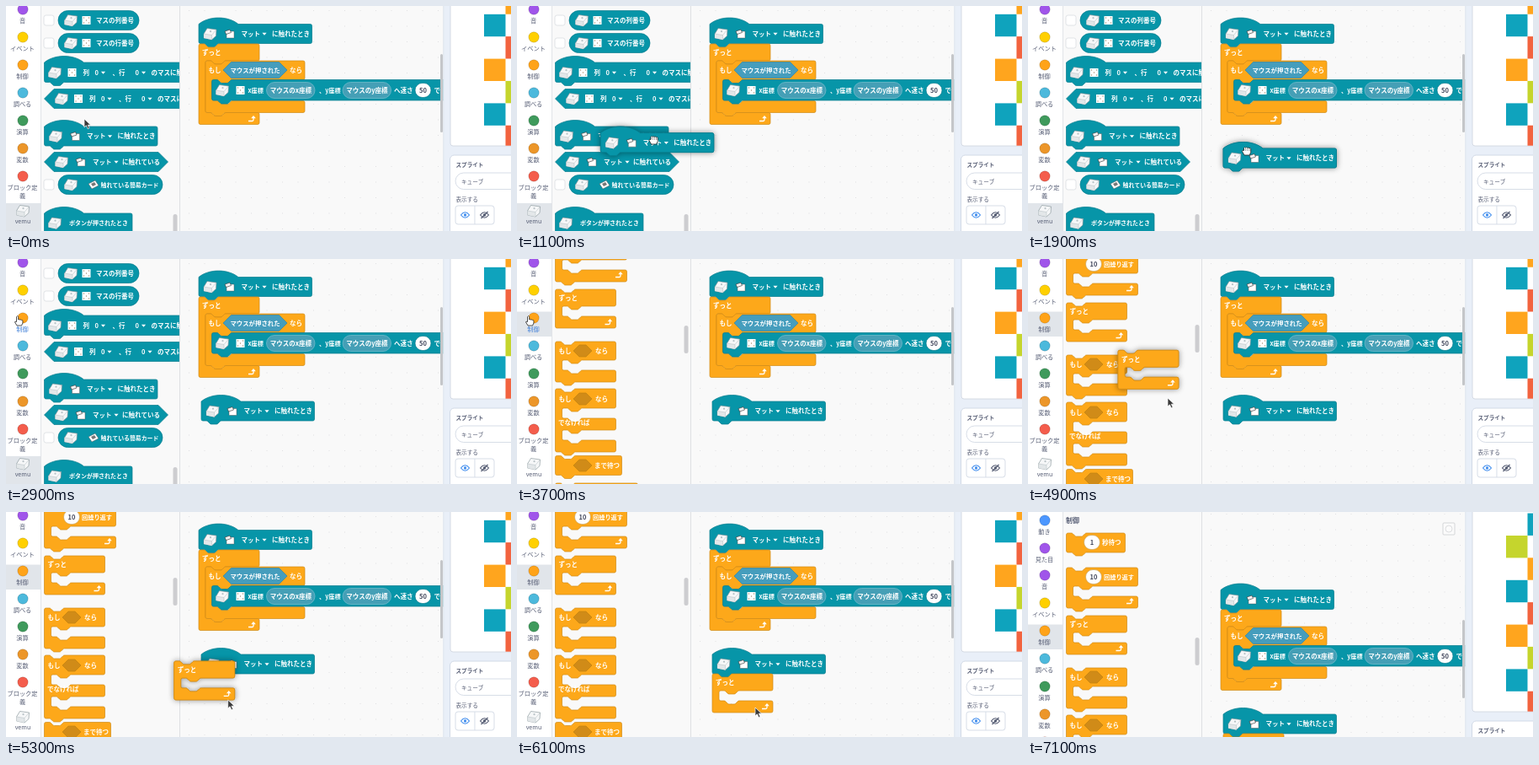
Write an HTML page with a canvas that moves like this. It is 600 px wide and 267 px high and loops after 8 s.

```html
<!DOCTYPE html>
<html lang="ja">
<head>
<meta charset="utf-8">
<title>Block editor</title>
<style>
html, body { margin: 0; width: 100%; height: 100%; overflow: hidden; background: #f9f9f9; }
canvas { display: block; width: 600px; height: 267px; }
</style>
</head>
<body>
<canvas id="stage"></canvas>
<script>
const canvas = document.getElementById('stage');
const ctx = canvas.getContext('2d');
const ratio = window.devicePixelRatio || 1;
canvas.width = 600 * ratio;
canvas.height = 267 * ratio;

const LOOP = 8000, STEP = 100;
const FAMILY = '"Noto Sans CJK JP", "Noto Sans CJK", "Noto Sans", sans-serif';
const TEAL = ['#0795a8', '#067c8d'];
const ORANGE = ['#fda81a', '#d08b18'];
const BLUE = ['#459dbd', '#2f86a8'];
const GREEN = ['#59c059', '#389438'];
const INK = '#575e75';

// Cursor path: time, x, y of the tip
const PATH = [
  [0, 93, 134], [400, 93, 134], [600, 73, 147], [800, 73, 147], [1000, 110, 152],
  [1200, 215, 168], [1400, 260, 173], [2500, 260, 173], [2700, 140, 125], [2900, 15, 73],
  [4200, 15, 73], [4500, 88, 90], [4600, 96, 92], [4700, 118, 108], [4800, 154, 140],
  [4900, 166, 165], [5100, 225, 205], [5400, 283, 232], [LOOP, 283, 232]
];

function cursorAt(t) {
  const i = Math.max(1, PATH.findIndex(p => p[0] >= t));
  const [t0, x0, y0] = PATH[i - 1], [t1, x1, y1] = PATH[i];
  const k = (t - t0) / (t1 - t0);
  return [x0 + (x1 - x0) * k, y0 + (y1 - y0) * k];
}

// ---- primitives ----
function rect(x, y, w, h, fill) {
  ctx.fillStyle = fill;
  ctx.fillRect(x, y, w, h);
}

function paint(path, fill, stroke, width = 0.7) {
  if (fill) { ctx.fillStyle = fill; ctx.fill(path); }
  if (stroke) { ctx.strokeStyle = stroke; ctx.lineWidth = width; ctx.stroke(path); }
}

function round(x, y, w, h, r, fill, stroke, width) {
  const p = new Path2D();
  p.roundRect(x, y, w, h, r);
  paint(p, fill, stroke, width);
}

function dot(x, y, r, fill, stroke, width) {
  const p = new Path2D();
  p.arc(x, y, r, 0, 7);
  paint(p, fill, stroke, width);
}

function label(text, x, y, { color = '#fff', size = 7.5, weight = 700, align = 'left' } = {}) {
  ctx.font = `${weight} ${size}px ${FAMILY}`;
  ctx.textAlign = align;
  ctx.textBaseline = 'middle';
  ctx.fillStyle = color;
  ctx.fillText(text, x, y);
}

function clipped(x, w, body) {
  ctx.save();
  ctx.beginPath();
  ctx.rect(x, -80, w, 360);
  ctx.clip();
  body();
  ctx.restore();
}

// ---- block shapes ----
const NOTCH = 'c1,0 1.5,.5 2,1l2,2c.5,.5 1,1 2,1h6c1,0 1.5,-.5 2,-1l2,-2c.5,-.5 1,-1 2,-1';
const NOTCH_BACK = 'c-1,0 -1.5,.5 -2,1l-2,2c-.5,.5 -1,1 -2,1h-6c-1,0 -1.5,-.5 -2,-1l-2,-2c-.5,-.5 -1,-1 -2,-1';

// rows alternate between solid bars and open mouths
function block(x, y, w, rows, [fill, edge], { hat = false, cap = false } = {}) {
  const right = x + w - 2;
  let d = hat ? `M${x},${y}c12,-10 35,-10 47,0` : `M${x},${y + 2}q0,-2 2,-2h4${NOTCH}`;
  d += `H${right}q2,0 2,2`;
  rows.forEach((h, i) => {
    y += h;
    if (i % 2) d += `V${y - 2}q0,2 2,2h4${NOTCH}H${right}q2,0 2,2`;
    else {
      d += `V${y - 2}q0,2 -2,2`;
      if (i < rows.length - 1) d += `H${x + 32}${NOTCH_BACK}h-4q-2,0 -2,2`;
    }
  });
  if (!cap) d += `H${x + 24}${NOTCH_BACK}`;
  d += `H${x + 2}q-2,0 -2,-2z`;
  paint(new Path2D(d), fill, edge);
}

function hex(x, y, w, h, [fill, edge]) {
  const r = h / 2;
  paint(new Path2D(`M${x},${y}l${r},${-r}h${w - h}l${r},${r}l${-r},${r}h${h - w}z`), fill, edge);
}

function pill(x, y, w, h, [fill, edge]) {
  round(x, y - h / 2, w, h, h / 2, fill, edge);
}

function number(text, x, y, edge = '#c9a35a') {
  pill(x - 9.5, y, 19, 17, ['#fff', edge]);
  label(text, x, y + 0.5, { color: '#3f455a', align: 'center' });
}

function arrowDown(x, y) {
  paint(new Path2D(`M${x - 2.6},${y - 1.2}h5.2l-2.6,3z`), '#fff');
}

function loopArrow(x, y) {
  paint(new Path2D(`M${x - 4},${y + 2.5}h4.5q1.5,0 1.5,-1.5v-2`), null, '#fff', 1.3);
  paint(new Path2D(`M${x - 0.8},${y - 0.8}h5.6l-2.8,-3.2z`), '#fff');
}

// ---- block icons ----
function cube(x, y) {
  paint(new Path2D(`M${x - 7.5},${y}l4,-6.5l11,1.5l-.5,7.5l-5,4.5l-9.5,-2z`), '#f6f7f8', '#7d8b90', 0.6);
  paint(new Path2D(`M${x - 7.5},${y}l9.5,1.5v5.5l-9.5,-2z`), '#e3e7e9');
  paint(new Path2D(`M${x - 7.5},${y}l9.5,1.5l5.5,-6.5M${x + 2},${y + 1.5}v5.5`), null, '#b3bcc0', 0.5);
  dot(x + 0.5, y - 2.8, 1.1, '#b8c2c6');
}

function tile(x, y) {
  rect(x - 5, y - 5, 10, 10, '#fff');
  for (const [dx, dy] of [[-3, -3], [3, -3], [0, 0], [-3, 3], [3, 3]]) dot(x + dx, y + dy, 0.7, '#a58f72');
}

function mat(x, y) {
  round(x - 4, y - 3, 9, 8, 0.5, '#fff', '#555', 0.5);
  paint(new Path2D(`M${x - 6},${y - 3}l6,-2l1.5,3.5l-6,2z`), '#f2f2f2', '#333', 0.6);
}

function card(x, y) {
  paint(new Path2D(`M${x - 6},${y - 1}l8,-4l4,6l-8,4z`), '#fff', '#555', 0.5);
  paint(new Path2D(`M${x - 3},${y - 1}l4,-2l2,3l-4,2z`), '#777');
}

// ---- composite blocks ----
function matHat(x, y) {
  block(x, y, 134.5, [23], TEAL, { hat: true });
  const m = y + 11.5;
  cube(x + 13.5, m);
  mat(x + 37, m);
  label('マット', x + 50.5, m);
  arrowDown(x + 78, m);
  label('に触れたとき', x + 87, m);
}

function forever(x, y) {
  block(x, y, 72, [20, 12, 14], ORANGE, { cap: true });
  label('ずっと', x + 4, y + 10.5);
  loopArrow(x + 63, y + 39);
}

function operand(text, x) {
  pill(x, 100, 57.5, 19, ['#459fb6', '#78bfce']);
  label(text, x + 28.8, 100, { align: 'center' });
}

function mainStack() {
  matHat(229, 21.5);
  block(229, 45, 72, [20, 61.5, 14], ORANGE, { cap: true });
  label('ずっと', 233, 55);
  loopArrow(292, 134);
  block(237, 65, 118, [22.5, 25, 14], ORANGE);
  label('もし', 240.5, 76);
  hex(258, 76, 76, 19, BLUE);
  label('マウスが押された', 296, 76, { align: 'center', size: 7.4 });
  label('なら', 337, 76);
  block(244.5, 87.5, 300, [24.5], TEAL);
  cube(257, 100);
  tile(278.5, 100);
  label('x座標', 287.5, 100, { size: 7.2 });
  operand('マウスのx座標', 309.5);
  label('、y座標', 372, 100, { size: 7.2 });
  operand('マウスのy座標', 400);
  label('へ速さ', 461, 100);
  number('50', 495.5, 100, TEAL[1]);
  label('で', 508.5, 100);
}

// ---- palettes ----
function reporter(text, y, w, icon, iconX, textX, size) {
  round(45, y - 6, 12, 12, 2.5, '#fff', '#d4d8dd');
  pill(62, y, w, 23, TEAL);
  cube(77, y);
  icon(iconX, y);
  label(text, textX, y, { size });
}

function cellLabels(x, y) {
  tile(x, y);
  label('列', x + 13, y);
  label('0', x + 27, y);
  arrowDown(x + 37, y);
  label('、行', x + 48, y);
  label('0', x + 75, y);
  arrowDown(x + 85, y);
  label('のマスに触れた', x + 94, y);
}

function cubePalette() {
  reporter('マスの列番号', 17, 96, tile, 95.5, 107);
  reporter('マスの行番号', 44, 96, tile, 95.5, 107);
  block(45.5, 67, 200, [23.5], TEAL, { hat: true });
  cube(58, 79);
  cellLabels(78.5, 79);
  hex(45.5, 110, 220, 23, TEAL);
  cube(66, 110);
  cellLabels(86, 110);
  matHat(45.5, 143);
  hex(45.5, 185, 147, 23, TEAL);
  cube(66, 185);
  mat(89, 185);
  label('マット', 103, 185);
  arrowDown(131, 185);
  label('に触れている', 138, 185);
  reporter('触れている簡易カード', 212, 124, card, 104, 112.5, 6.9);
  block(45.5, 246, 104.5, [23], TEAL, { hat: true });
  cube(58, 257.5);
  label('ボタンが押されたとき', 75, 257.5, { size: 7 });
}

function ifHead(y) {
  label('もし', 49.5, y);
  hex(67, y, 22, 14, [ORANGE[1], '#c0810f']);
  label('なら', 93, y);
}

function controlPalette() {
  label('制御', 45, -61, { color: INK, size: 8 });
  block(45.5, -46, 70, [23], ORANGE);
  number('1', 76, -35);
  label('秒待つ', 88, -35);
  block(45.5, -5, 85, [22, 12, 14], ORANGE);
  number('10', 78, 6);
  label('回繰り返す', 90, 6, { size: 7.2 });
  loopArrow(121, 35);
  forever(45.5, 52);
  block(45.5, 114, 72, [22, 12, 14], ORANGE);
  ifHead(125);
  block(45.5, 170, 72, [23, 12, 14, 12, 14], ORANGE);
  ifHead(182);
  label('でなければ', 49, 210);
  block(45.5, 249.5, 79, [23], ORANGE);
  hex(67, 261, 22, 14, [ORANGE[1], '#c0810f']);
  label('まで待つ', 92, 261);
  block(45.5, 282, 98, [22, 12, 14], ORANGE);
  hex(67, 293, 22, 14, [ORANGE[1], '#c0810f']);
  label('まで繰り返す', 92, 293);
  loopArrow(134, 322);
  block(45.5, 347, 76, [23], ORANGE, { cap: true });
  label('すべて', 50, 358);
  arrowDown(78, 358);
  label('を止める', 85, 358);
  block(45.5, 393, 92, [23], ORANGE, { hat: true });
  label('クローンされたとき', 50, 404);
}

function operatorPalette() {
  for (let i = 0; i < 18; i++) {
    const y = 1050 + i * 33;
    pill(45, y, 66, 21, GREEN);
    pill(50, y, 19, 15, ['#fff', GREEN[1]]);
    label('+-×÷'[i % 4], 78, y, { align: 'center' });
    pill(87, y, 19, 15, ['#fff', GREEN[1]]);
  }
}

// ---- regions ----
const CATEGORIES = [
  ['動き', -61, '#4c97ff'], ['見た目', -28, '#a055ea'], ['音', 4, '#a055ea'],
  ['イベント', 37, '#ffd000'], ['制御', 70, '#ffa319'], ['調べる', 103, '#4cb9dc'],
  ['演算', 136, '#3f9a5c'], ['変数', 169, '#ec9629'], ['ブロック定', 202, '#f45d4c']
];

function categories(selected, hovered) {
  rect(0, -80, 41, 360, '#fff');
  const plain = { color: INK, size: 7.2, weight: 500, align: 'center' };
  for (const [name, y, color] of CATEGORIES) {
    if (name === selected) rect(0, y - 7.5, 41, 29.5, '#e1e5ea');
    dot(20, y, 6.2, color, 'rgba(0,0,0,.18)', 0.8);
    label(name, 19.5, y + 13.5, { ...plain, color: name === hovered ? '#3f7fd8' : INK });
  }
  label('義', 19.5, 225, plain);
  if (selected === 'vemu') rect(0, 234, 41, 50, '#e1e5ea');
  cube(20, 243);
  label('vemu', 20, 255, plain);
  rect(41, -80, 0.8, 360, '#dcdfe4');
}

function palette(scroll) {
  rect(41, -80, 165, 360, '#f9f9f9');
  clipped(41, 165, () => {
    if (scroll === null) return cubePalette();
    ctx.translate(0, -scroll);
    controlPalette();
    operatorPalette();
  });
  rect(206, -80, 0.8, 360, '#d8dade');
  const thumb = scroll === null ? 247 : 78 + scroll * 0.07;
  round(198.5, thumb, 5, 33, 2.5, '#cdcdd0');
}

function workspace(t) {
  rect(206, -80, 313.5, 360, '#f9f9f9');
  clipped(206, 313.5, () => {
    for (let x = 217; x < 519; x += 18.5)
      for (let y = -69; y < 270; y += 18.5) rect(x, y, 1, 1, '#e0e0e2');
    round(493, -58, 14, 14, 1, '#fbfbfb', '#c5c7ca');
    dot(500, -51, 4, null, '#d5d6d9', 0.8);
    mainStack();
    if (t >= 2000) matHat(232, 169);
    if (t >= 5600) forever(232, 192);
    round(516, 57, 3, 93, 1.5, '#c4c6c9');
  });
}

function eye(x, y, color, off) {
  paint(new Path2D(`M${x - 5},${y}q5,-6.5 10,0q-5,6.5 -10,0z`), null, color, 1.2);
  dot(x, y, 1.7, color);
  if (off) paint(new Path2D(`M${x - 4},${y + 4}l8,-8`), null, color, 1.2);
}

function sidePanel() {
  rect(519.5, -80, 81, 360, '#e9eff8');
  rect(519.5, -80, 0.8, 360, '#dde3ec');
  round(528, -90, 90, 256, 3, '#fff', '#cdd4de', 0.8);
  const lime = '#c5d52d', teal = '#0fa3bd', orange = '#ffa51e', red = '#f2633f';
  const cell = 26.4;
  [lime, teal, orange, teal].forEach((c, i) => rect(568, -43 + i * 2 * cell, 25.5, cell, c));
  [teal, orange, red, lime, red].forEach((c, i) => rect(593.5, -69.5 + i * 2 * cell, 7, i < 4 ? cell : 24, c));
  round(527.5, 177, 90, 110, 5, '#fff', '#cdd6e4', 0.9);
  const small = { color: INK, size: 6.6, weight: 500 };
  label('スプライト', 534.5, 188.5, { ...small, weight: 700 });
  round(534, 198, 90, 19.5, 9.75, '#fff', '#d3dae5', 0.9);
  label('キューブ', 541, 208, small);
  label('表示する', 534.5, 229.5, small);
  round(534, 237, 46, 22, 3, '#fff', '#d3dae5', 0.9);
  rect(556.5, 237, 0.9, 22, '#d3dae5');
  eye(545.5, 248, '#4590ee');
  eye(568.5, 248, INK, true);
}

// ---- cursors ----
function arrowCursor(x, y) {
  paint(new Path2D(`M${x},${y}v10l2.4,-2.2l1.8,4l1.8,-.9l-1.7,-3.7h3.3z`), '#3a3a3a', '#fff', 0.7);
}

function grabCursor(x, y) {
  paint(new Path2D(`M${x - 3},${y + 4}l-2.5,-4.5q0,-2 2,-1v-3q1,-2 2,0q1,-2 2.2,0q1.2,-1.3 2.2,.3q1.5,-.8 1.8,.8v4l-1.5,3.4z`), '#fff', '#222', 0.8);
  paint(new Path2D(`M${x - 1.4},${y - 4}v3M${x + 0.8},${y - 4}v3M${x + 3},${y - 3.7}v2.7`), null, '#444', 0.5);
}

function pointCursor(x, y) {
  paint(new Path2D(`M${x - 2},${y + 6}l-2.5,-4q0,-1.6 2,-.5v-6q1.2,-1.8 2.2,0v3.5q1.2,-1 2,.2q1.2,-.8 1.8,.4q1.3,-.4 1.4,1v2.4l-1.4,3z`), '#fff', '#222', 0.8);
}

function cursor(t) {
  const [x, y] = cursorAt(t);
  if (t >= 600 && t < 2600) grabCursor(x, y);
  else if (t >= 2900 && t < 4300) pointCursor(x, y);
  else arrowCursor(x, y);
}

function lifted(shape, x, y) {
  ctx.save();
  ctx.shadowColor = 'rgba(0,0,0,.4)';
  ctx.shadowBlur = 7 * ratio;
  shape(x, y);
  ctx.restore();
  shape(x, y);
}

// Dragged blocks trail slightly behind the cursor
function dragged(t) {
  const [x, y] = cursorAt(Math.max(0, t - 67));
  if (t >= 900 && t < 2000) lifted(matHat, x - 28, y - 4);
  if (t >= 4700 && t < 5600) lifted(forever, x - 51, y - 40);
}

function selectedCategory(scroll) {
  if (scroll === null) return 'vemu';
  return scroll > 900 ? '演算' : '制御';
}

function draw(t) {
  const scroll = t < 3500 ? null : 1150 * Math.pow(0.118, (t - 3500) / 100);
  const panned = t >= 7100;
  ctx.setTransform(ratio, 0, 0, ratio, 0, 0);
  if (panned) ctx.translate(0, 71);
  workspace(t);
  palette(scroll);
  categories(selectedCategory(scroll), t >= 2900 && t < 4300 ? '制御' : '');
  sidePanel();
  dragged(t);
  if (!panned) cursor(t);
}

function tick() {
  const t = performance.now() % LOOP;
  draw(Math.floor(t / STEP) * STEP);
  requestAnimationFrame(tick);
}
tick();
</script>
</body>
</html>
```
